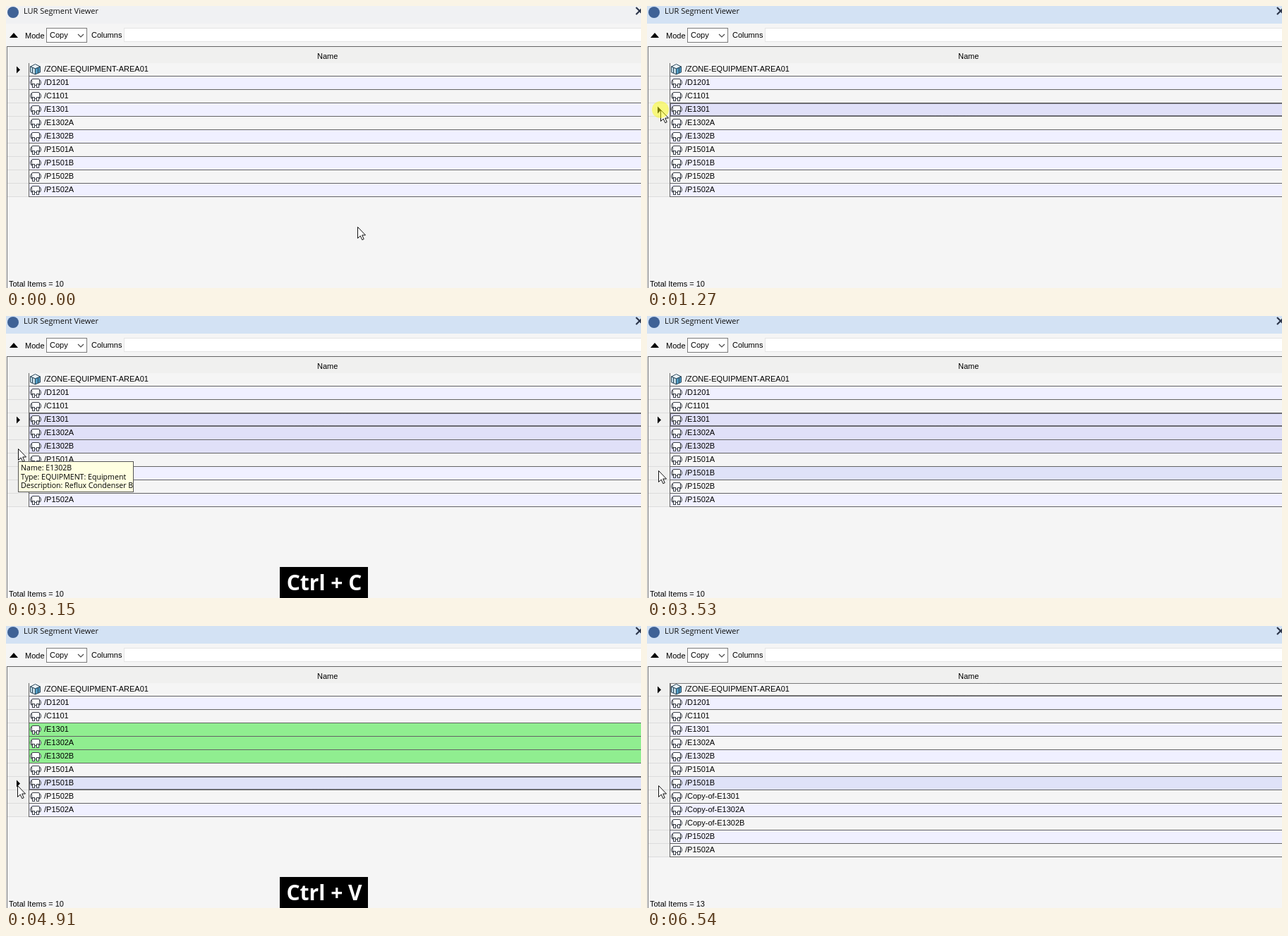
An HTML page with a canvas for the animation above (7550 ms loop, 900x400 px).

```html
<!DOCTYPE html>
<html lang="en">
<head>
<meta charset="utf-8">
<title>Copying rows in a list</title>
<style>
  html, body { margin: 0; width: 100%; height: 100%; overflow: hidden; background: #f5f5f5; }
  canvas { display: block; }
</style>
</head>
<body>
<canvas id="stage" width="900" height="400"></canvas>
<script>
const ctx = document.getElementById('stage').getContext('2d');
const LOOP = 7550;
const ROW_TOP = 81, ROW_H = 19;
const UI = '11px "Liberation Sans", Arial, sans-serif';
const TITLE = '11px "Open Sans", "Noto Sans", sans-serif';
const TIP = '10.6px "Open Sans", "Noto Sans", sans-serif';
const KEYS = 'bold 30px "Open Sans", "Noto Sans", sans-serif';

const before = ['ZONE-EQUIPMENT-AREA01', 'D1201', 'C1101', 'E1301', 'E1302A', 'E1302B',
  'P1501A', 'P1501B', 'P1502B', 'P1502A'];
const copies = before.slice(3, 6).map(name => 'Copy-of-' + name);
const after = [...before.slice(0, 8), ...copies, ...before.slice(8)];

const start = {
  at: [498, 313], rows: before, total: 10, current: 0, focus: -1, selected: 0,
  copied: false, active: false, press: false, busy: false, keys: '', tip: false
};

// Each step changes part of the state at its time.
const steps = [
  [130, { at: [462, 301] }],
  [255, { at: [356, 257] }],
  [380, { at: [168, 181] }],
  [505, { at: [83, 147] }],
  [630, { at: [48, 142] }],
  [755, { at: [28, 145] }],
  [880, { at: [19, 147] }],
  [1130, { press: true }],
  [1270, { active: true, current: 3, focus: 3, selected: 1 }],
  [1395, { at: [18, 167], current: 4, focus: 4, selected: 2 }],
  [1520, { at: [17, 186], current: 5, focus: 5, selected: 3 }],
  [1880, { press: false }],
  [2270, { keys: 'Ctrl + C' }],
  [2400, { current: 3, focus: 3 }],
  [3150, { at: [17, 188], tip: true }],
  [3275, { keys: '' }],
  [3400, { at: [17, 201], tip: false }],
  [3525, { at: [16, 219] }],
  [3650, { at: [16, 226] }],
  [4030, { press: true }],
  [4160, { press: false, current: 7, focus: 7, selected: 0, copied: true }],
  [4910, { keys: 'Ctrl + V' }],
  [5910, { keys: '' }],
  [6040, { busy: true }],
  [6290, { rows: after, copied: false }],
  [6415, { current: 0, focus: 0, total: 13 }],
  [6540, { busy: false }]
];

function stateAt(t) {
  const state = { ...start };
  for (const [time, change] of steps) if (t >= time) Object.assign(state, change);
  return state;
}

function rect(x, y, w, h, color) {
  ctx.fillStyle = color;
  ctx.fillRect(x, y, w, h);
}

function frame(x, y, w, h, color) {
  ctx.strokeStyle = color;
  ctx.lineWidth = 1;
  ctx.strokeRect(x + 0.5, y + 0.5, w - 1, h - 1);
}

function text(s, x, y, font = UI, color = '#000') {
  ctx.font = font;
  ctx.fillStyle = color;
  ctx.fillText(s, x, y);
}

function path(points, fill, stroke, width = 1, close = true) {
  ctx.beginPath();
  points.forEach(([x, y]) => ctx.lineTo(x, y));
  if (close) ctx.closePath();
  if (fill) { ctx.fillStyle = fill; ctx.fill(); }
  if (stroke) { ctx.strokeStyle = stroke; ctx.lineWidth = width; ctx.stroke(); }
}

function disc(x, y, r, color) {
  ctx.beginPath();
  ctx.arc(x, y, r, 0, Math.PI * 2);
  ctx.fillStyle = color;
  ctx.fill();
}

function drawChrome(s) {
  rect(0, 0, 900, 400, '#f5f5f5');
  rect(0, 0, 900, 25, s.active ? '#d3e2f4' : '#f0f1f3');
  disc(10, 9, 8, '#3f6296');
  text('LUR Segment Viewer', 25, 11, TITLE, '#111');
  path([[893, 2], [903, 12]], null, '#2b3448', 2.2, false);
  path([[893, 12], [903, 2]], null, '#2b3448', 2.2, false);

  path([[5, 45], [11, 38], [17, 45]], '#000');
  text('Mode', 27, 46);
  rect(57, 31, 58, 21, '#fff');
  frame(57, 31, 58, 21, '#7a7a7a');
  text('Copy', 62, 45);
  path([[102, 40], [106, 44], [110, 40]], null, '#444', 1.1, false);
  text('Columns', 121, 45);
  rect(168, 32, 732, 19, '#fff');
  frame(167, 31, 740, 20, '#e4e4e4');

  rect(2, 58, 898, 23, '#f0f0ef');
  rect(1, 57, 899, 1, '#646464');
  rect(1, 57, 1, 343, '#747474');
  text('Name', 441, 75);
  text('Total Items = ' + s.total, 4, 398);
}

function zoneIcon(y) {
  const ink = '#2c4658';
  path([[34.5, y + 5], [41.5, y + 1.5], [48.5, y + 5], [41.5, y + 8]], '#e9f3f8', ink);
  path([[34.5, y + 5], [41.5, y + 8], [41.5, y + 16], [34.5, y + 13]], '#c3dce8', ink);
  path([[48.5, y + 5], [41.5, y + 8], [41.5, y + 16], [48.5, y + 13]], '#4f9cc4', ink);
  rect(37, y + 7, 1, 7, ink);
  rect(45, y + 7, 1, 7, ink);
}

function vesselIcon(y) {
  ctx.strokeStyle = '#3d424b';
  ctx.fillStyle = '#fff';
  ctx.lineWidth = 1;
  ctx.beginPath();
  ctx.roundRect(34.5, y + 4.5, 15, 8, 3.5);
  ctx.fill();
  ctx.stroke();
  ctx.beginPath();
  ctx.roundRect(36.5, y + 3.5, 11, 9, 1.5);
  ctx.fill();
  ctx.stroke();
  for (const x of [37.5, 43.5]) {
    ctx.fillRect(x, y + 10.5, 3, 5);
    ctx.strokeRect(x, y + 10.5, 3, 5);
  }
}

function rowColor(s, i) {
  if (s.copied && i >= 3 && i <= 5) return '#90ee90';
  if (i >= 3 && i < 3 + s.selected) return '#e0e0f8';
  if (i === Math.floor((s.at[1] - ROW_TOP) / ROW_H)) return '#dfe2f8';
  return i % 2 ? '#f0f0ff' : '#f5f5f5';
}

function drawRow(s, name, i) {
  const y = ROW_TOP + i * ROW_H;
  rect(2, y, 30, ROW_H, '#f0f0ef');
  rect(2, y + 18, 30, 1, '#dcdcdc');
  rect(33, y, 867, 18, rowColor(s, i));
  rect(32, y + 18, 868, 1, '#646464');
  if (i) vesselIcon(y); else zoneIcon(y);
  text('/' + name, 54, y + 12);
  if (i === s.focus) {
    ctx.setLineDash([1, 1]);
    frame(33, y, 880, 18, '#000');
    ctx.setLineDash([]);
  }
  if (i === s.current) path([[15, y + 4.5], [20, y + 9.5], [15, y + 14.5]], '#000');
}

function drawTip() {
  rect(17, 206, 164, 44, '#ffffe1');
  frame(17, 206, 164, 44, '#555');
  const lines = ['Name: E1302B', 'Type: EQUIPMENT: Equipment', 'Description: Reflux Condenser B'];
  lines.forEach((line, i) => text(line, 21, 219 + i * 12.5, TIP));
}

function drawKeys(label) {
  rect(388, 356, 125, 44, '#000');
  ctx.textAlign = 'center';
  text(label, 451, 389, KEYS, '#fff');
  ctx.textAlign = 'left';
}

function drawPointer(s, t) {
  const [x, y] = s.at;
  if (s.busy) {
    const turn = t / 160;
    ctx.lineWidth = 4;
    ctx.strokeStyle = '#3aa0dc';
    ctx.beginPath();
    ctx.arc(x, y, 9, 0, Math.PI * 2);
    ctx.stroke();
    ctx.strokeStyle = '#a8dcf5';
    ctx.beginPath();
    ctx.arc(x, y, 9, turn, turn + 1.6);
    ctx.stroke();
    return;
  }
  const shape = [[0.5, 0.5], [0.5, 16.5], [4.2, 13], [6.8, 18.7], [9.2, 17.6], [6.7, 12], [11.5, 12]];
  path(shape.map(([dx, dy]) => [x + dx, y + dy]), '#fff', '#111');
  if (s.press) disc(x, y, 12, 'rgba(255,255,0,0.47)');
}

function draw(t) {
  const s = stateAt(t);
  drawChrome(s);
  s.rows.forEach((name, i) => drawRow(s, name, i));
  rect(32, ROW_TOP, 1, s.rows.length * ROW_H, '#646464');
  if (s.keys) drawKeys(s.keys);
  if (s.tip) drawTip();
  drawPointer(s, t);
}

const begin = performance.now();
function tick() {
  draw((performance.now() - begin) % LOOP);
  requestAnimationFrame(tick);
}
tick();
</script>
</body>
</html>
```
